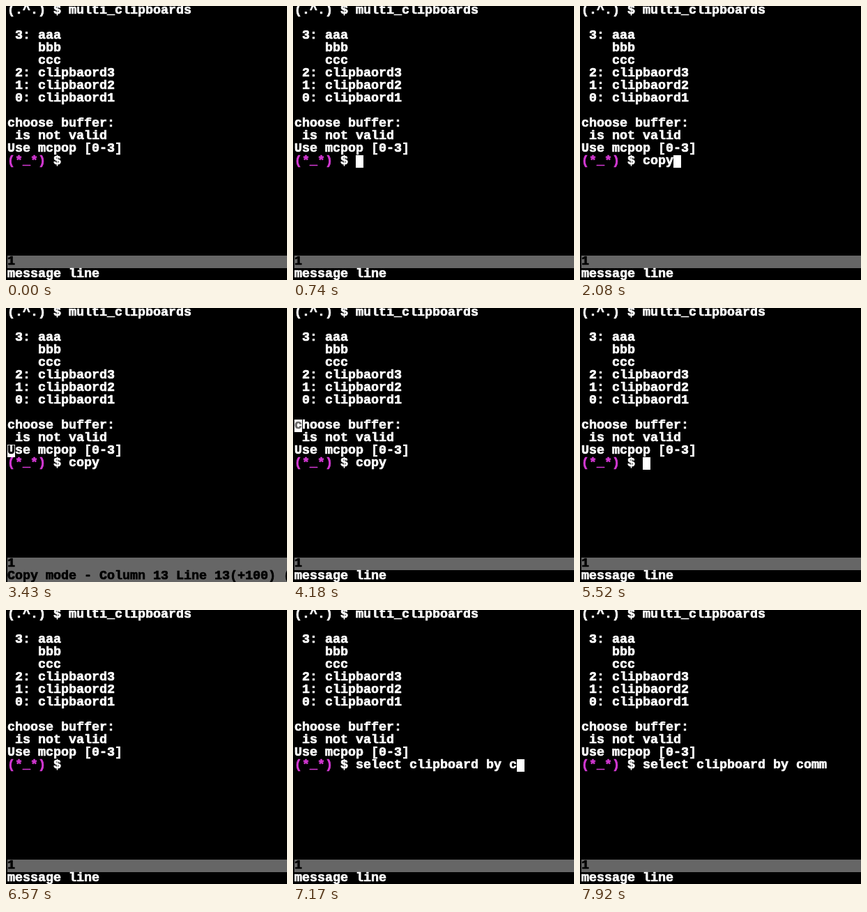
Write an HTML page with a canvas that moves like this. It is 403x393 px and loops after 8 s.

```html
<!DOCTYPE html>
<html lang="en">
<head>
<meta charset="utf-8">
<title>Terminal</title>
<style>
html, body { margin: 0; height: 100%; overflow: hidden; background: #000; }
canvas { display: block; }
</style>
</head>
<body>
<canvas id="screen" width="403" height="393"></canvas>
<script>
const ctx = document.getElementById('screen').getContext('2d');
const W = 403, H = 393, LOOP = 8000;
const CW = 11, RH = 18, LEFT = 2, TOP = -2, BASE = 13;
const WHITE = '#fff', BLACK = '#000', GREY = '#666', PINK = '#d338d3';
const PROMPT_ROW = 12, BAR_ROW = 20, MSG_ROW = 21;

const lines = [
  '(.^.) $ multi_clipboards', '',
  ' 3: aaa', '    bbb', '    ccc',
  ' 2: clipbaord3', ' 1: clipbaord2', ' 0: clipbaord1', '',
  'choose buffer:', ' is not valid', 'Use mcpop [0-3]'
];
const COPY_MODE = 'Copy mode - Column 13 Line 13(+100) (80,20)';
const phrase = 'select clipboard by comm';

// Steps: [start ms, typed text, cursor [row, col] or 'end' or none, selecting, message]
const steps = [
  [0, ''],
  [740, '', 'end'],
  [1640, 'co', 'end'],
  [1930, 'cop', 'end'],
  [2080, 'copy', 'end'],
  [3130, 'copy', [11, 12], false, COPY_MODE],
  [3430, 'copy', [11, 0], false, COPY_MODE],
  [3730, 'copy', [10, 0], false, COPY_MODE],
  [3880, 'copy', [9, 0], false, COPY_MODE],
  [4180, 'copy', [9, 0], true],
  [4320, 'copy', [10, 0], true],
  [4470, 'copy', [11, 0], true],
  [4770, 'copy', [11, 14], true],
  [4920, 'copy', 'end'],
  [5520, '', 'end'],
  [6570, ''],
  [6720, phrase.slice(0, 19), 'end'],
  [7020, phrase.slice(0, 20), 'end'],
  [7170, phrase.slice(0, 21), 'end'],
  [7320, phrase.slice(0, 22), 'end'],
  [7470, phrase.slice(0, 23), 'end'],
  [7770, phrase, 'end'],
  [7920, phrase]
];

function fill(row, col, width, color) {
  ctx.fillStyle = color;
  ctx.fillRect(LEFT + col * CW, TOP + row * RH, width, RH);
}

// A thin outline gives the heavy terminal weight.
function text(str, row, col = 0, color = WHITE) {
  const x = LEFT + col * CW, y = TOP + row * RH + BASE;
  ctx.fillStyle = ctx.strokeStyle = color;
  ctx.fillText(str, x, y);
  ctx.strokeText(str, x, y);
}

function cell(str, row, col, fg, bg) {
  fill(row, col, str.length * CW, bg);
  text(str, row, col, fg);
}

function bar(str, row) {
  fill(row, 0, W, GREY);
  text(str, row, 0, BLACK);
}

function draw(t) {
  const [, typed, cursor, selecting, message] = steps.findLast(s => s[0] <= t);
  ctx.fillStyle = BLACK;
  ctx.fillRect(0, 0, W, H);
  ctx.font = 'bold 18.33px "Liberation Mono", monospace';
  ctx.lineWidth = 0.7;
  ctx.lineJoin = 'round';

  lines.forEach((line, row) => text(line, row));
  text('(*_*)', PROMPT_ROW, 0, PINK);
  text('$ ' + typed, PROMPT_ROW, 6);
  bar('1', BAR_ROW);
  if (message) bar(message, MSG_ROW);
  else text('message line', MSG_ROW);

  if (!cursor) return;
  const [row, col] = cursor === 'end' ? [PROMPT_ROW, 8 + typed.length] : cursor;
  if (selecting) {
    for (let r = 9; r <= row; r++) {
      cell(r < row ? lines[r] : lines[r].slice(0, col), r, 0, BLACK, GREY);
    }
  }
  cell((lines[row] || '')[col] || ' ', row, col, selecting ? GREY : BLACK, WHITE);
}

function frame() {
  draw(performance.now() % LOOP);
  requestAnimationFrame(frame);
}
frame();
</script>
</body>
</html>
```
